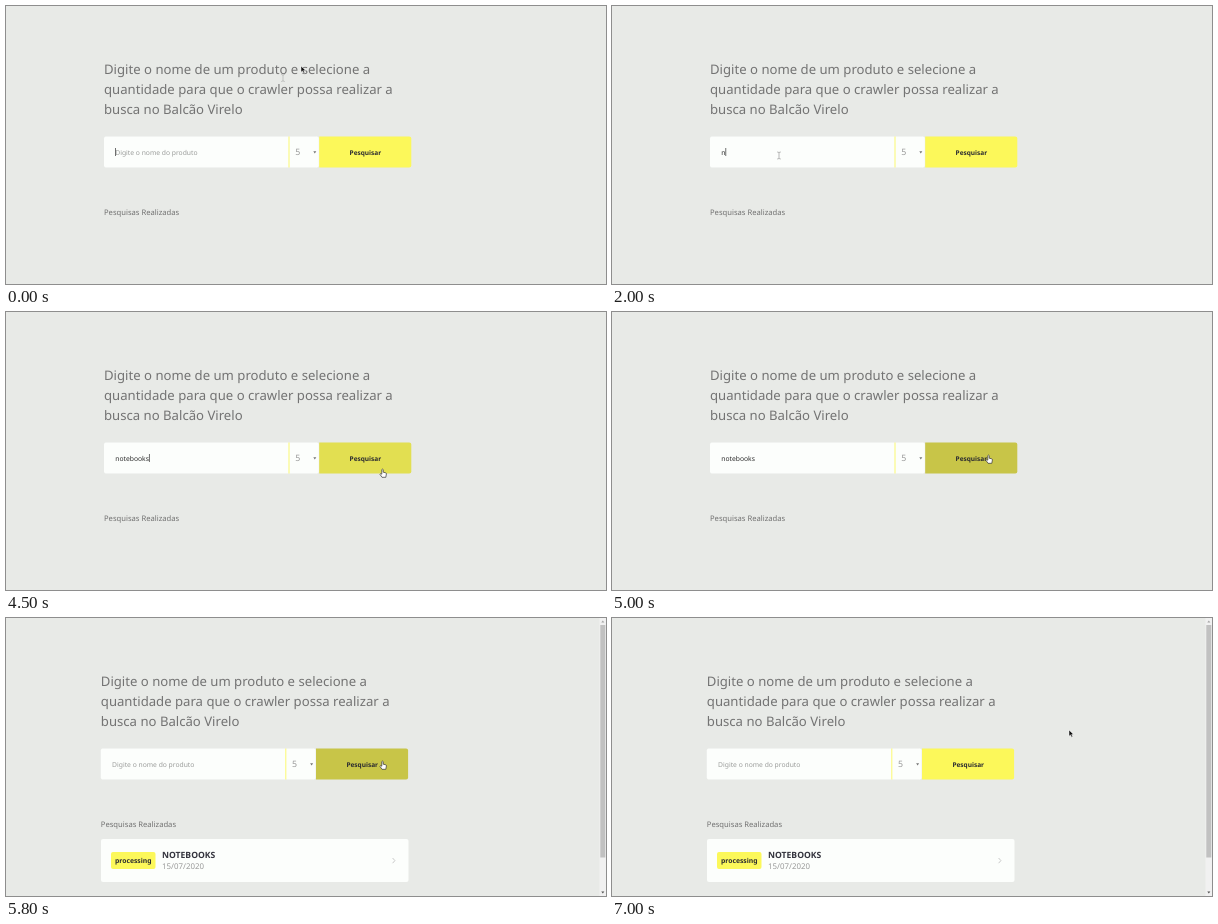
An HTML page that plays this animation: 600 px wide and 278 px high, repeating every 8000 ms.

```html
<!DOCTYPE html>
<html lang="pt">
<head>
<meta charset="utf-8">
<title>Busca de produtos</title>
<style>
  html, body { margin: 0; width: 100%; height: 100%; overflow: hidden; background: #e8eae7; }
  svg { display: block; width: 600px; height: 278px; font-family: "Noto Sans", "Open Sans", sans-serif; text-rendering: geometricPrecision; }
  .panel { fill: #fcfefc; }
  .yellow { fill: #fcf85a; }
  .title { font-size: 13.15px; fill: #737373; }
  .field { font-size: 6.75px; font-weight: 500; fill: #2b2b2b; }
  .muted { fill: #9a9c9a; font-weight: 400; }
  .strong { font-weight: 600; fill: #2b2b30; text-anchor: middle; }
</style>
</head>
<body>
<svg viewBox="0 0 600 278">
  <defs>
    <path id="arrow" d="M0 0V6.2L1.5 4.9L2.6 7.2L3.7 6.7L2.7 4.5H4.6Z" fill="#111" stroke="#fff" stroke-width=".5"/>
    <path id="ibeam" d="M-1.8-3.5Q0-3.5 0-2.6Q0-3.5 1.8-3.5M0-2.8V2.8M-1.8 3.5Q0 3.5 0 2.6Q0 3.5 1.8 3.5" fill="none" stroke="#999" stroke-width=".7"/>
    <path id="hand" d="M-.7.6Q0-.4.7.6V3.2L3.2 3.8Q4 4 3.9 5L3.3 8.3H-.5L-2.6 5.2Q-2.4 4-.7 5.2Z" fill="#fff" stroke="#333" stroke-width=".7"/>
  </defs>
  <rect width="600" height="278" fill="#e8eae7"/>
  <g id="page">
    <g class="title">
      <text x="98" y="67.5">Digite o nome de um produto e selecione a</text>
      <text x="98" y="88">quantidade para que o crawler possa realizar a</text>
      <text x="98" y="108">busca no Balcão Virelo</text>
    </g>
    <rect class="panel" x="98" y="130.5" width="214.8" height="31" rx="2"/>
    <rect class="yellow" x="282.5" y="130.5" width="1" height="31" opacity=".85"/>
    <text x="289.3" y="149.3" font-size="8.8" fill="#999">5</text>
    <path d="M307.3 145.2h3l-1.5 2.2z" fill="#777"/>
    <path id="button" d="M313.2 130.5H403.3Q405.3 130.5 405.3 132.5V159.5Q405.3 161.5 403.3 161.5H313.2Z"/>
    <text class="strong" x="359.4" y="148.5" font-size="6.5">Pesquisar</text>
    <text id="field" class="field" x="109.3" y="148.5"></text>
    <rect id="caret" y="142" width=".7" height="8" fill="#333"/>
    <text x="98" y="209" font-size="7.63" fill="#707070">Pesquisas Realizadas</text>
  </g>
  <g id="result">
    <rect class="panel" x="95" y="221" width="307.5" height="43" rx="2"/>
    <rect class="yellow" x="105" y="234" width="44.5" height="17" rx="2"/>
    <text class="strong" x="127.3" y="245" font-size="6.8">processing</text>
    <text x="156" y="240" font-size="8.6" font-weight="700" fill="#33333d">NOTEBOOKS</text>
    <text x="156" y="251" font-size="7.9" fill="#999">15/07/2020</text>
    <path d="M386.6 240l2.3 2.6-2.3 2.6" fill="none" stroke="#bbb" stroke-width=".8"/>
    <rect x="593.5" width="6.5" height="278" fill="#f1f1f1"/>
    <rect x="594.3" y="7" width="5" height="232.5" fill="#c1c1c1"/>
    <path d="M595.3 4.5h3l-1.5-2z" fill="#a3a3a3"/>
    <path d="M595.3 273.5h3l-1.5 2z" fill="#505050"/>
  </g>
  <circle id="ring" cx="377" cy="144.5" fill="none" stroke="#c0501c" stroke-width="1"/>
  <use id="ghost" href="#ibeam" x="277" y="72" opacity=".7"/>
  <use id="pointer"/>
</svg>
<script>
const LOOP = 8000, STEP = 100, LOADED = 5800;
const [page, button, field, caret, result, ring, ghost, pointer] =
  ["page", "button", "field", "caret", "result", "ring", "ghost", "pointer"].map(id => document.getElementById(id));

// time, x, y, shape from that time on
const path = [
  [0, 295, 60, "arrow"], [100, 302, 82, "ibeam"], [200, 318, 118, "arrow"], [300, 334, 148, "hand"],
  [400, 325, 172, "arrow"], [500, 280, 177, "arrow"], [700, 188, 157, "ibeam"], [900, 167, 149.5, "ibeam"],
  [2800, 167.5, 150.3, "arrow"], [3500, 167.5, 150.3, "arrow"], [3600, 140, 151, "ibeam"], [4100, 140, 151, "ibeam"],
  [4200, 185, 154, "ibeam"], [4300, 292, 160, "arrow"], [4400, 364, 160, "hand"], [4500, 376.5, 157, "hand"],
  [4700, 376.5, 143, "hand"], [6100, 376.5, 143, "hand"], [6300, 418, 137, "arrow"], [6500, 442, 128, "arrow"],
  [6700, 442, 128, "arrow"], [7000, 457, 112, "arrow"], [LOOP, 457, 112, "arrow"]
];
const keyTimes = [2000, 2200, 2300, 2400, 2600, 2700, 2900, 3000, 3100];
const hovers = [[300, 400], [4400, 6300]];

const clamp = v => Math.max(0, Math.min(1, v));
const mix = (a, b, k) => a + (b - a) * k;
const show = (el, on) => el.setAttribute("visibility", on ? "visible" : "hidden");

function pointerAt(t) {
  const i = path.findIndex(p => p[0] > t);
  const [t0, x0, y0, shape] = path[i - 1], [t1, x1, y1, next] = path[i];
  const k = shape === next ? (t - t0) / (t1 - t0) : 0;
  return [mix(x0, x1, k), mix(y0, y1, k), shape];
}

function draw(t) {
  const loaded = t >= LOADED;
  page.setAttribute("transform", `translate(${loaded ? -3.2 : 0})`);
  show(result, loaded);

  const typed = loaded ? "" : "notebooks".slice(0, keyTimes.filter(k => k <= t).length);
  field.textContent = typed || "Digite o nome do produto";
  field.classList.toggle("muted", !typed);
  const typing = t >= 2000 && t < 3200;
  caret.setAttribute("x", 109.3 + (typed ? field.getComputedTextLength() : 0));
  show(caret, t < 5700 && (typing || Math.floor((t + 400) / 600) % 2 === 0));

  const hover = Math.max(...hovers.map(([from, to]) => clamp((t - from) / 200) - clamp((t - to) / 200)));
  button.setAttribute("fill", `rgb(${mix(252, 200, hover)},${mix(248, 197, hover)},${mix(90, 72, hover)})`);

  show(ring, t >= 5600 && t < LOADED);
  ring.setAttribute("r", t < 5700 ? 4 : 6.8);
  show(ghost, t < STEP);

  const [x, y, shape] = pointerAt(t);
  pointer.setAttribute("href", "#" + shape);
  pointer.setAttribute("transform", `translate(${x} ${y})`);
}

function tick() {
  draw(Math.floor(performance.now() % LOOP / STEP) * STEP);
  requestAnimationFrame(tick);
}
tick();
</script>
</body>
</html>
```
